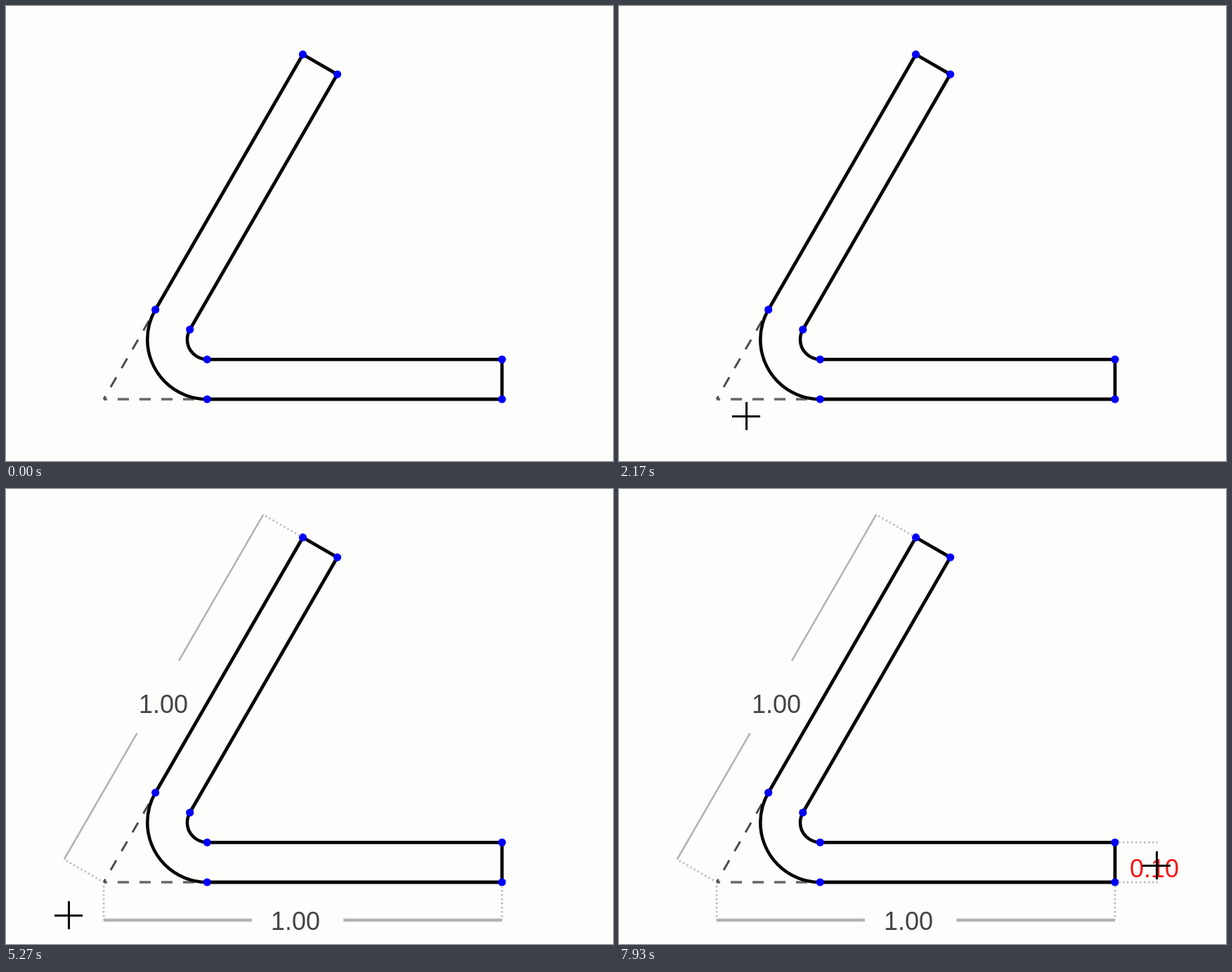
An HTML page with a canvas that plays this animation: 864 by 648 pixels, repeating every 8 s.

```html
<!DOCTYPE html>
<html lang="en">
<head>
<meta charset="utf-8">
<title>Bent profile dimensions</title>
<style>
html, body { margin: 0; width: 100%; height: 100%; overflow: hidden; background: #fdfdfb; }
canvas { position: absolute; left: 0; top: 0; width: 864px; height: 648px; }
#drawing { filter: blur(0.6px); }
</style>
</head>
<body>
<canvas id="drawing" width="864" height="648"></canvas>
<canvas id="pointer" width="864" height="648"></canvas>
<script>
const ctx = document.getElementById('drawing').getContext('2d');
const top2d = document.getElementById('pointer').getContext('2d');
const LOOP = 8000;
const INK = '#060606', RED = '#f51616', TEXT = '#444';

// Everything in the profile follows from its leg length and bend angle.
const LEG = 567, THICK = LEG * 0.1, RADIUS = LEG * 0.15, ANGLE = Math.PI / 3;
const TANGENT = RADIUS / Math.tan(ANGLE / 2);
const apex = [139, 560];
const right = [1, 0], down = [0, 1];
const slope = [Math.cos(ANGLE), -Math.sin(ANGLE)];
const outward = [-Math.sin(ANGLE), -Math.cos(ANGLE)];

const move = ([x, y], [dx, dy], d) => [x + dx * d, y + dy * d];
const baseEnd = move(apex, right, LEG), baseFoot = move(apex, right, TANGENT);
const slantEnd = move(apex, slope, LEG), slantFoot = move(apex, slope, TANGENT);
const inBase = p => move(p, down, -THICK), inSlant = p => move(p, outward, -THICK);
const center = move(baseFoot, down, -RADIUS);
const corners = [
  baseEnd, baseFoot, inBase(baseEnd), inBase(baseFoot),
  slantEnd, slantFoot, inSlant(slantEnd), inSlant(slantFoot)
];

// Pointer strokes, each starting where the last one stopped
const strokes = [
  { from: 870, to: 1600, at: [224, 647] },
  { from: 1600, to: 2470, at: [165, 560] },
  { from: 2530, to: 3100, at: [172, 562] },
  { from: 3200, to: 3870, at: [165, 513] },
  { from: 5100, to: 5270, at: [89, 607] },
  { from: 5270, to: 5400, at: [69, 670] },
  { from: 5400, to: 5900, at: [806, 670], hidden: true },
  { from: 5900, to: 6430, at: [713, 526] },
  { from: 6570, to: 6800, at: [706, 534] },
  { from: 7470, to: 7930, at: [765, 536] }
];

const within = (t, a, b) => t >= a && t < b;
const ease = k => k * k * (3 - 2 * k);

function pointerAt(t) {
  if (t < strokes[0].from) return null;
  let pos = [839, 645];
  for (const { from, to, at, hidden } of strokes) {
    if (t < from) break;
    if (hidden && t < to) return null;
    const k = ease(Math.min(1, (t - from) / (to - from)));
    pos = pos.map((v, i) => v + (at[i] - v) * k);
  }
  return pos;
}

function line(a, b, color, width, dash = [], offset = 0) {
  ctx.strokeStyle = color;
  ctx.lineWidth = width;
  ctx.setLineDash(dash);
  ctx.lineDashOffset = offset;
  ctx.beginPath();
  ctx.moveTo(...a);
  ctx.lineTo(...b);
  ctx.stroke();
}

function arc([x, y], radius, from = 0, to = Math.PI * 2) {
  ctx.beginPath();
  ctx.arc(x, y, radius, from, to);
}

function label(text, x, y, color = TEXT) {
  ctx.fillStyle = color;
  ctx.fillText(text, x, y);
}

function bend(radius) {
  ctx.strokeStyle = INK;
  ctx.lineWidth = 4.6;
  ctx.setLineDash([]);
  arc(center, radius, Math.PI / 2, Math.PI * 3 / 2 - ANGLE);
  ctx.stroke();
}

function profile() {
  line(apex, baseFoot, '#666', 3.6, [16, 15], 11);
  line(apex, slantFoot, '#4c4c4c', 3, [16, 15], 11);
  const edge = (a, b) => line(a, b, INK, 4.8);
  edge(baseFoot, baseEnd);
  edge(inBase(baseFoot), inBase(baseEnd));
  edge(slantFoot, slantEnd);
  edge(inSlant(slantFoot), inSlant(slantEnd));
  edge(baseEnd, inBase(baseEnd));
  edge(slantEnd, inSlant(slantEnd));
  bend(RADIUS);
  bend(RADIUS - THICK);
}

function dots() {
  ctx.fillStyle = '#0000f8';
  for (const p of corners) {
    arc(p, 5.6);
    ctx.fill();
  }
}

function extension(p, dir, length) {
  line(move(p, dir, 5), move(p, dir, length), '#c0c0c0', 3, [2.5, 3.5]);
}

function legDimension(dir, side, distance, gap, width) {
  const start = move(apex, side, distance);
  const along = k => move(start, dir, LEG * k);
  extension(apex, side, distance);
  extension(move(apex, dir, LEG), side, distance);
  line(start, along(gap[0]), '#b4b4b4', width);
  line(along(gap[1]), along(1), '#b4b4b4', width);
}

function draw(t) {
  const pos = pointerAt(t);
  ctx.clearRect(0, 0, 864, 648);
  ctx.font = '36px "Liberation Sans", Arial, sans-serif';
  ctx.textAlign = 'center';

  profile();
  if (within(t, 2530, 3130)) line(apex, baseEnd, RED, 5);
  if (within(t, 3700, 4230)) line(apex, slantEnd, RED, 5);
  if (within(t, 6750, 7070)) line(baseEnd, inBase(baseEnd), RED, 5);
  dots();

  if (t >= 3130) {
    legDimension(right, down, 54, [0.372, 0.602], 4.6);
    label('1.00', 412, 628);
  }
  if (t >= 4230) {
    legDimension(slope, outward, 65, [0.366, 0.576], 2.6);
    label('1.00', 224, 319);
  }
  if (t >= 7070) {
    extension(baseEnd, right, 61);
    extension(inBase(baseEnd), right, 61);
    label('0.10', 762, 553, pos[0] > 727 ? RED : TEXT);
  }
  drawPointer(pos);
}

function drawPointer(pos) {
  top2d.clearRect(0, 0, 864, 648);
  if (!pos) return;
  const [x, y] = pos.map(Math.round);
  top2d.fillRect(x - 20, y - 1, 40, 3);
  top2d.fillRect(x - 1, y - 20, 3, 40);
}

const start = performance.now();
function tick() {
  draw((performance.now() - start) % LOOP);
  requestAnimationFrame(tick);
}
tick();
</script>
</body>
</html>
```
